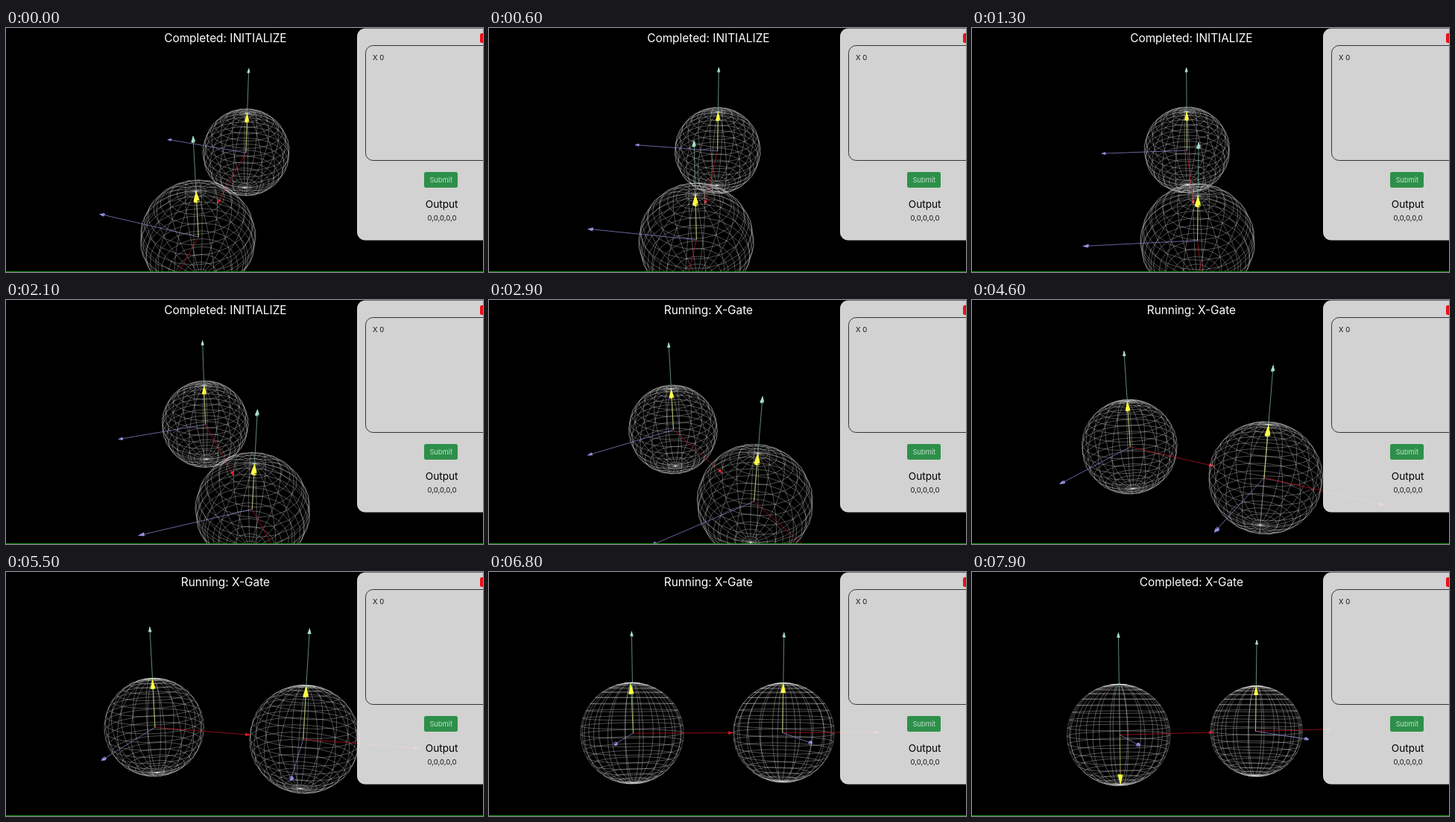
These frames come from a looping animation (640 by 327 pixels, 8 s). An HTML page with a canvas:

```html
<!DOCTYPE html>
<html>
<head>
<meta charset="utf-8">
<style>
html, body { margin: 0; width: 100%; height: 100%; overflow: hidden; background: #000; }
canvas, svg { position: absolute; left: 0; top: 0; }
text { font-family: Inter, "Liberation Sans", sans-serif; text-anchor: middle; }
</style>
</head>
<body>
<canvas id="view" width="640" height="327"></canvas>
<svg width="640" height="327">
  <text id="title" x="294.4" y="18.5" font-size="15.4" fill="#fff"></text>
  <rect x="471" y="0.5" width="200" height="284" rx="11" fill="#f0f0f0" fill-opacity=".88"/>
  <rect x="482.5" y="23.5" width="200" height="154" rx="10" fill="none" stroke="#222" stroke-width=".9"/>
  <text x="492" y="43" font-size="9.5" fill="#111" style="text-anchor:start">X 0</text>
  <rect x="636" y="7" width="20" height="13" rx="2.5" fill="#e8101c"/>
  <rect x="561" y="193" width="45" height="21" rx="2.5" fill="#2d904a"/>
  <text x="583.7" y="207" font-size="9.3" fill="#c0dec8">Submit</text>
  <text x="584.7" y="240.5" font-size="13.6" fill="#000">Output</text>
  <text x="585" y="257.5" font-size="9.5" fill="#111">0,0,0,0,0</text>
  <rect y="326" width="640" height="1" fill="#128a0c"/>
</svg>
<script>
const ctx = document.getElementById('view').getContext('2d');
const title = document.getElementById('title');
const LOOP = 8000, FOCAL = 540, CX = 294.5, CY = 215.7, MERIDIANS = 20, RINGS = 20;

// Camera keys: time, azimuth, elevation, distance
const keys = [
  [0, 108.4, 36.2, 8.2], [1300, 86, 37.3, 8.28], [2100, 71.8, 36.5, 8.23], [3700, 44.4, 29.6, 7.97],
  [5500, 15.5, 16.7, 7.87], [6800, -2.6, 4.8, 8.08], [7900, -18.5, 4.6, 8.46]
];
let cam;

const slope = (i, c) => (keys[i + 1][c] - keys[i][c]) / (keys[i + 1][0] - keys[i][0]);

function tangent(i, c) {
  if (i === 0) return slope(0, c);
  if (i === keys.length - 1) return slope(i - 1, c);
  const a = slope(i - 1, c), b = slope(i, c);
  return a * b > 0 ? 2 * a * b / (a + b) : 0;
}

// Monotone cubic interpolation of one camera column
function sample(t, c) {
  let i = 0;
  while (i < keys.length - 2 && t > keys[i + 1][0]) i++;
  const h = keys[i + 1][0] - keys[i][0], s = Math.min(1, (t - keys[i][0]) / h);
  const r = 1 - s;
  return r * r * (1 + 2 * s) * keys[i][c] + s * s * (3 - 2 * s) * keys[i + 1][c]
    + h * s * r * (r * tangent(i, c) - s * tangent(i + 1, c));
}

function setCamera(t) {
  const a = sample(t, 1) * Math.PI / 180, e = sample(t, 2) * Math.PI / 180;
  cam = { sa: Math.sin(a), ca: Math.cos(a), se: Math.sin(e), ce: Math.cos(e), d: sample(t, 3) };
}

function project([x, y, z]) {
  const { sa, ca, se, ce, d } = cam, near = x * sa + z * ca;
  const k = FOCAL / (d - near * ce - y * se);
  return [CX + k * (x * ca - z * sa), CY - k * (y * ce - near * se)];
}

function trace(points) {
  points.forEach((p, i) => {
    const [x, y] = project(p);
    i ? ctx.lineTo(x, y) : ctx.moveTo(x, y);
  });
}

function sphere(ox) {
  const at = (ring, mer) => {
    const p = Math.PI * ring / RINGS, q = 2 * Math.PI * mer / MERIDIANS;
    return [ox + Math.sin(p) * Math.cos(q), Math.cos(p), Math.sin(p) * Math.sin(q)];
  };
  const range = n => Array.from({ length: n + 1 }, (_, i) => i);
  ctx.beginPath();
  for (let r = 1; r < RINGS; r++) trace(range(MERIDIANS).map(m => at(r, m)));
  for (let m = 0; m < MERIDIANS; m++) trace(range(RINGS).map(r => at(r, m)));
  ctx.strokeStyle = 'rgba(255,255,255,.43)';
  ctx.lineWidth = 0.7;
  ctx.stroke();
}

function arrow(ox, dir, len, headLen, radius, color, head) {
  const [dx, dy, dz] = dir;
  const along = s => [ox + dx * s, dy * s, dz * s];
  const u = dx ? [0, 1, 0] : [1, 0, 0];
  const v = [dy * u[2] - dz * u[1], dz * u[0] - dx * u[2], dx * u[1] - dy * u[0]];
  const base = along(len - headLen), tip = along(len);
  const rim = i => base.map((b, k) =>
    b + radius * (u[k] * Math.cos(i * Math.PI / 4) + v[k] * Math.sin(i * Math.PI / 4)));
  ctx.strokeStyle = color;
  ctx.lineWidth = 0.8;
  ctx.beginPath();
  trace([along(0), base]);
  ctx.stroke();
  ctx.fillStyle = head;
  for (let i = 0; i < 8; i++) {
    ctx.beginPath();
    trace([tip, rim(i), rim(i + 1), base]);
    ctx.fill();
  }
}

function qubit(ox, angle) {
  sphere(ox);
  arrow(ox, [1, 0, 0], 2, 0.1, 0.033, '#b3121f', '#d81828');
  arrow(ox, [0, 1, 0], 2, 0.1, 0.033, '#78ab99', '#a5dcc8');
  arrow(ox, [0, 0, 1], 2, 0.1, 0.033, '#7f7fc0', '#9092e0');
  arrow(ox, [0, Math.cos(angle), Math.sin(angle)], 1, 0.2, 0.052, '#c6c660', '#ffff45');
}

function frame(now) {
  const t = now % LOOP;
  setCamera(t);
  ctx.clearRect(0, 0, 640, 327);
  const turn = Math.PI * Math.min(1, Math.max(0, (t - 6730) / 1000));
  const qubits = [[-1.5, turn], [1.5, 0]];
  if (cam.sa < 0) qubits.reverse();
  qubits.forEach(q => qubit(...q));
  title.textContent = t < 2800 ? 'Completed: INITIALIZE' : t < 7750 ? 'Running: X-Gate' : 'Completed: X-Gate';
  requestAnimationFrame(frame);
}
requestAnimationFrame(frame);
</script>
</body>
</html>
```
